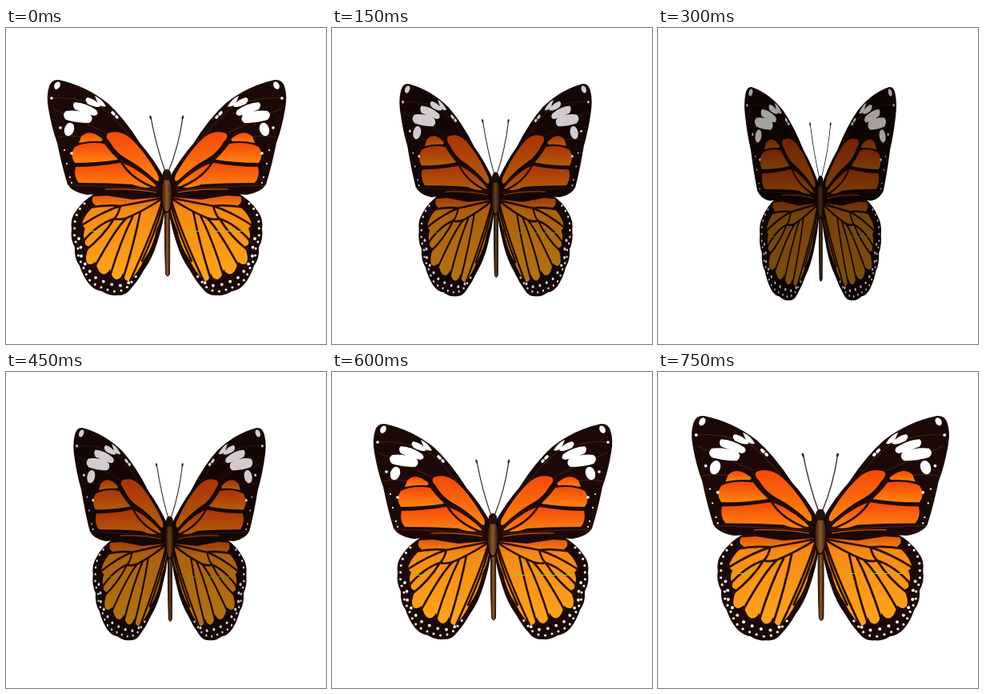
An HTML page for the animation above (0.9 s loop, 400 by 396 pixels).

```html
<!DOCTYPE html>
<html lang="en">
<head>
<meta charset="utf-8">
<title>Butterfly</title>
<style>
  html, body { margin: 0; width: 100%; height: 100%; overflow: hidden; background: #fff; }
  svg { display: block; width: 100%; height: 100%; }
  .dark { fill: #1c0907; }
  .vein { fill: none; stroke: #2a0d05; stroke-width: 2.6; stroke-linecap: round; }
  .sheen { fill: none; stroke: #54260f; stroke-width: .9; }
  .dots { fill: none; stroke-linecap: round; }
</style>
</head>
<body>
<svg viewBox="0 0 400 396">
  <defs>
    <linearGradient id="hindFill" x1="0" y1="0" x2="0" y2="1">
      <stop offset="0" stop-color="#e2560c"/>
      <stop offset=".16" stop-color="#f58a16"/>
      <stop offset="1" stop-color="#ffa51c"/>
    </linearGradient>
    <linearGradient id="foreFill" x1="0" y1="0" x2="0" y2="1">
      <stop offset="0" stop-color="#f4480a"/>
      <stop offset="1" stop-color="#ff8410"/>
    </linearGradient>
    <linearGradient id="bodyFill">
      <stop offset="0" stop-color="#260f08"/>
      <stop offset=".5" stop-color="#91592a"/>
      <stop offset="1" stop-color="#260f08"/>
    </linearGradient>

    <g id="wing">
      <!-- hind wing -->
      <path class="dark" d="M197 204L112 207Q97 215 87 230Q80 239 82 252Q80 264 86 275Q85 289 92 298Q96 311 104 321Q111 329 120 330Q129 336 138 335Q149 336 155 328Q165 317 172 304Q183 289 189 269Q196 248 199 226Z"/>
      <path fill="url(#hindFill)" d="M194 212L158 215L126 210L109 211Q105 218 112 222Q101 230 96 242Q94 248 99 251Q95 260 99 267Q97 272 104 274Q98 287 101 294Q105 299 112 293Q115 306 120 308Q126 310 130 302Q132 313 137 315Q143 316 146 307Q148 318 154 317Q166 305 172 291Q184 274 188 253Q195 238 197 222Z"/>
      <path class="vein" d="M195 213Q160 220 143 223Q125 221 104 225M143 223Q121 230 95 247M143 223Q140 235 135 239Q114 246 95 269M135 239Q122 261 99 279M135 239Q142 241 151 238Q174 228 195 214M151 238Q137 251 111 299M159 235Q143 267 130 311M168 230Q160 271 146 315M195 217Q184 254 155 317M196 222Q186 258 170 292"/>

      <!-- fore wing -->
      <path class="dark" d="M198 188Q184 163 168 145Q148 113 127 94Q99 72 66 65Q57 64 54 73Q50 85 53 101Q57 125 64 144Q70 174 77 196Q83 206 101 209Q151 205 197 211Z"/>
      <path class="sheen" d="M58 88Q86 85 119 99Q148 121 187 181M58 101Q92 116 124 131M64 137Q86 132 119 142M78 197Q126 198 190 203"/>
      <g fill="url(#foreFill)">
        <path d="M127 132Q140 127 153 136Q172 152 190 184Q193 194 187 191Q168 173 151 164Q138 157 130 143Q123 136 127 132Z"/>
        <path d="M94 136Q103 127 115 135Q124 140 119 142Q106 141 91 144Z"/>
        <path d="M86 149Q100 142 123 145Q132 153 140 165Q115 169 86 169Q79 159 86 149Z"/>
        <path d="M87 174Q113 174 143 169Q168 175 188 198Q176 203 158 196Q130 194 91 194Q84 186 87 174Z"/>
      </g>
      <path class="vein" d="M123 143Q135 160 146 167Q175 181 193 201M144 168Q157 190 188 201" stroke-width="2"/>
      <path fill="none" stroke="#c8500e" stroke-width="1.2" d="M124 202Q157 201 188 206"/>
    </g>

    <g id="spots">
      <path d="M75 104Q90 102 106 109Q110 115 104 119Q88 119 75 115Q69 109 75 104ZM86 93Q101 94 113 103Q117 109 110 110Q96 106 86 102Q82 96 86 93ZM102 87Q112 89 118 98Q114 101 102 95Q97 89 102 87ZM111 85Q119 88 125 98Q121 100 115 95Z"/>
      <ellipse cx="64" cy="72" rx="3.5" ry="5" transform="rotate(28 64 72)"/>
      <ellipse cx="79" cy="127" rx="6" ry="8.5" transform="rotate(18 79 127)"/>
      <path class="dots" stroke-width="3.6" d="M57 88h0M68 125h0M82 157h0M133 106l2 2M138 111l1 1"/>
      <path class="dots" stroke-width="2.2" d="M73 153h0M76 170h0M80 187h0M82 194h0"/>
      <path class="dots" stroke-width="3" stroke-dasharray="0 8.6" d="M98 220Q85 233 86 249Q84 263 90 276Q89 288 96 297Q99 309 107 319Q119 326 134 330Q147 331 154 322L165 308"/>
      <path class="dots" stroke-width="3.8" stroke-dasharray="0 11" d="M91 264Q95 277 94 287Q101 300 109 311Q122 319 135 322Q147 325 156 317"/>
    </g>
  </defs>

  <g id="butterfly">
    <g id="art">
      <use href="#wing"/>
      <use href="#wing" transform="matrix(-1 0 0 1 402 0)"/>
      <path stroke="#8ed02c" d="M104 254.5h17M226 254.5h16M255 254.5h44"/>
      <path fill="none" stroke="#2b2420" stroke-width="1.2" d="M199 180Q188 149 181 112M203 180Q216 148 221 112"/>
      <path class="dots" stroke="#2b2420" stroke-width="2.4" d="M181 113l-.6-2M220.6 113l.6-2"/>
      <path fill="url(#bodyFill)" stroke="#261009" stroke-width="1" d="M198.5 226Q198 270 199.5 308Q202 314 204.5 308Q205 270 204.5 226Z"/>
      <ellipse cx="201" cy="208" rx="7" ry="23" fill="url(#bodyFill)" stroke="#1c0907" stroke-width="2"/>
      <ellipse cx="201" cy="184" rx="5.5" ry="7" fill="#24120d"/>
    </g>
    <g id="marks">
      <use href="#spots"/>
      <use href="#spots" transform="matrix(-1 0 0 1 402 0)"/>
    </g>
  </g>
</svg>
<script>
  const FRAME_MS = 150;
  const [butterfly, art, marks] = ["butterfly", "art", "marks"].map(id => document.getElementById(id));

  // Centre x, top y, scales, shade of the wings and colour of the spots.
  const wide = { x: 201, y: 65, sx: 1, sy: 1, shade: 1, spot: "#fff" };
  const half = { x: 204.5, y: 70, sx: .805, sy: .986, shade: .7, spot: "#d2ccd0" };
  const narrow = { x: 203, y: 74, sx: .636, sy: .99, shade: .48, spot: "#a4a29e" };
  const full = { x: 203, y: 55, sx: 1.078, sy: 1.042, shade: 1, spot: "#fff" };
  const flap = [wide, half, narrow, half, wide, full];

  function draw() {
    const pose = flap[Math.floor(performance.now() / FRAME_MS) % flap.length];
    butterfly.setAttribute("transform",
      `translate(${pose.x} ${pose.y}) scale(${pose.sx} ${pose.sy}) translate(-201 -65)`);
    art.style.filter = pose.shade < 1 ? `brightness(${pose.shade})` : "none";
    marks.setAttribute("fill", pose.spot);
    marks.setAttribute("stroke", pose.spot);
    marks.setAttribute("stroke-width", 0);
    requestAnimationFrame(draw);
  }
  draw();
</script>
</body>
</html>
```
